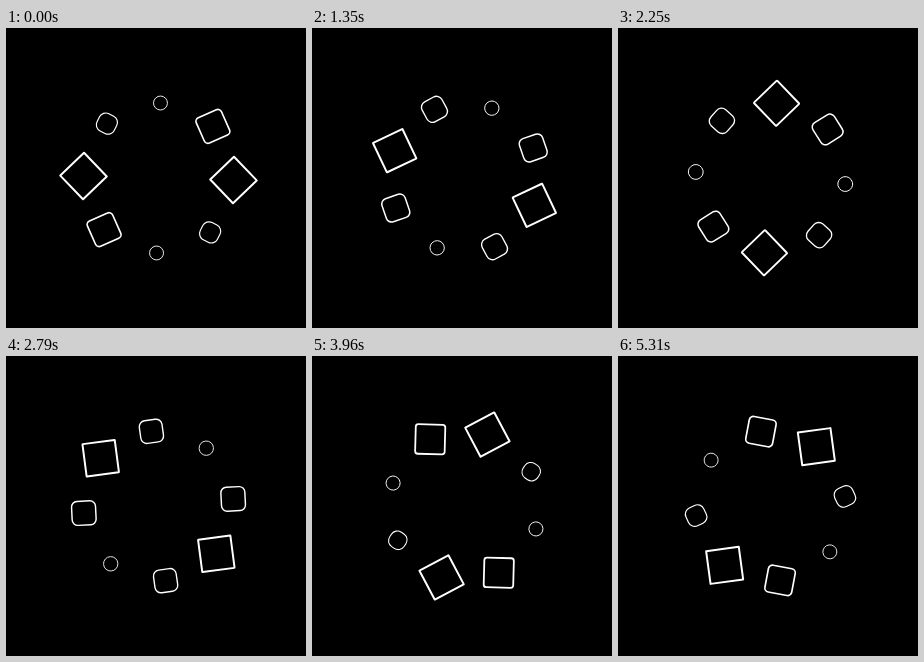
These frames come from a looping animation (300 px wide and 300 px high, 5.33 s). An HTML page with a canvas:

```html
<!DOCTYPE html>
<html lang="en">
<head>
<meta charset="utf-8">
<title>Ring of morphing squares</title>
<style>
  html, body { margin: 0; width: 100%; height: 100%; overflow: hidden; background: #000; }
  canvas { display: block; }
</style>
</head>
<body>
<canvas width="300" height="300"></canvas>
<script>
const ctx = document.querySelector('canvas').getContext('2d');
const LOOP = 5330, STEP = 90;
const CX = 152.5, CY = 150, RING = 75;
const SIZE = 33, LINE = 2, MIN_SCALE = 0.42;
const rad = deg => deg * Math.PI / 180;

// The CSS "ease" curve: cubic-bezier(.25, .1, .25, 1)
function ease(x) {
  const bezier = (a, b, s) => 3 * a * s * (1 - s) ** 2 + 3 * b * s * s * (1 - s) + s ** 3;
  let lo = 0, hi = 1;
  for (let i = 0; i < 24; i++) {
    const mid = (lo + hi) / 2;
    if (bezier(0.25, 0.25, mid) < x) lo = mid; else hi = mid;
  }
  return bezier(0.1, 1, lo);
}

// Phase 0..1 grows from circle to square, 1..2 shrinks back
function growth(phase) {
  const p = phase % 2;
  return p < 1 ? ease(p) : 1 - ease(p - 1);
}

function drawCell(angle, grow) {
  const scale = MIN_SCALE + (1 - MIN_SCALE) * grow;
  ctx.save();
  ctx.rotate(rad(angle));
  ctx.translate(RING, 0);
  ctx.rotate(rad(45 + 90 * grow));
  ctx.scale(scale, scale);
  ctx.beginPath();
  ctx.roundRect(-SIZE / 2, -SIZE / 2, SIZE, SIZE, SIZE / 2 * (1 - grow));
  ctx.stroke();
  ctx.restore();
}

function draw(now) {
  const n = Math.floor(now % LOOP / STEP);
  ctx.setTransform(1, 0, 0, 1, 0, 0);
  ctx.fillStyle = '#000';
  ctx.fillRect(0, 0, 300, 300);
  ctx.translate(CX, CY);
  ctx.strokeStyle = '#fff';
  ctx.lineWidth = LINE;
  for (let i = 0; i < 8; i++) {
    drawCell(1.5 + 45 * i - 1.675 * n, growth(0.925 + 0.5 * i + 0.093 * n));
  }
}

const start = performance.now();
function tick() {
  draw(performance.now() - start);
  requestAnimationFrame(tick);
}
tick();
</script>
</body>
</html>
```
